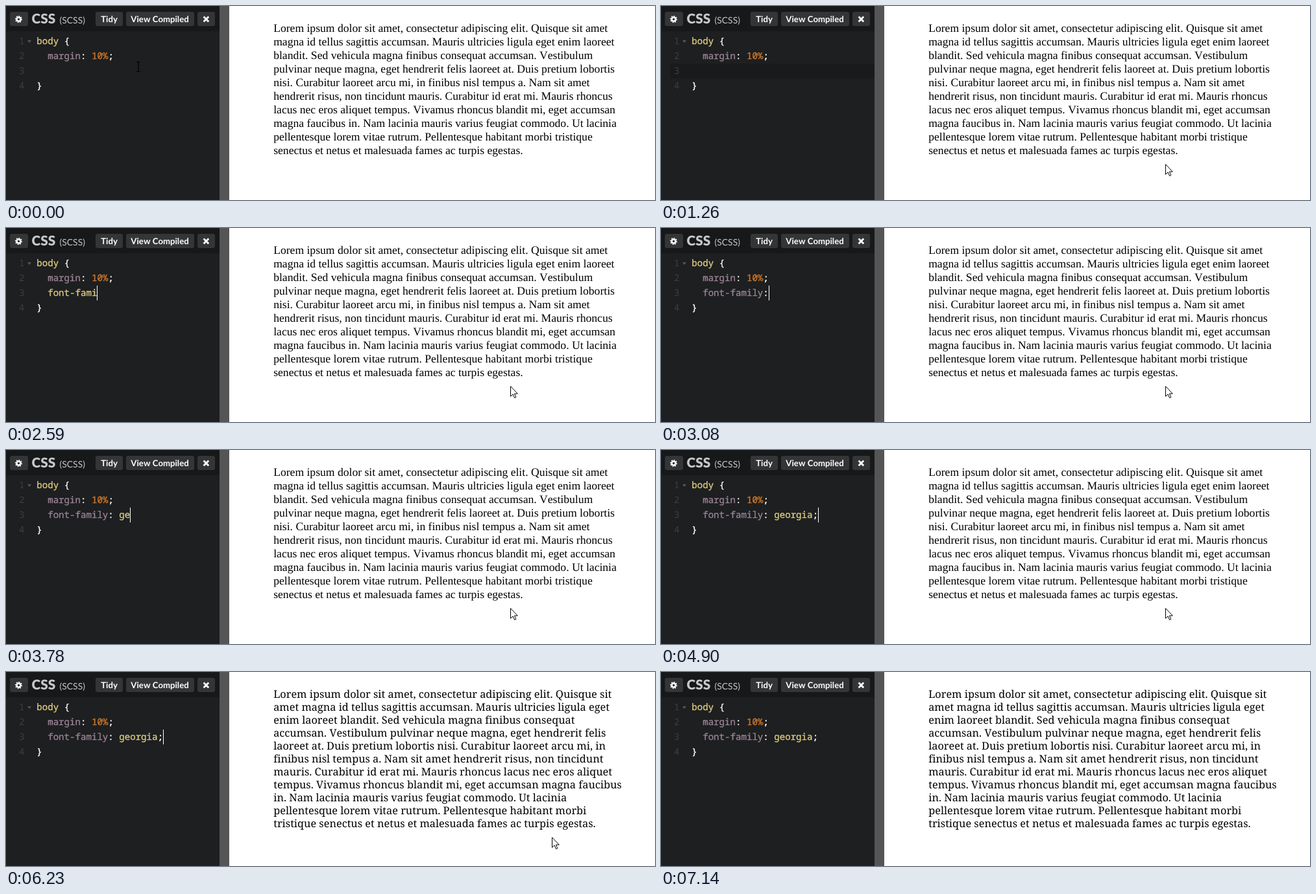
An HTML page for the animation above (7210 ms loop, 1000 px wide and 300 px high).

```html
<!DOCTYPE html>
<html lang="en">
<head>
<meta charset="utf-8">
<title>Typing a font-family rule</title>
<style>
  html, body { margin: 0; width: 100%; height: 100%; overflow: hidden; background: #fff; }
  svg { display: block; width: 1000px; height: 300px; }
  text { white-space: pre; text-rendering: geometricPrecision; font-kerning: none; font-variant-ligatures: none; }
  .code { font: 14.117px "Noto Sans Mono", "DejaVu Sans Mono", monospace; color: #fff; }
  .code text, .code tspan { fill: currentColor; stroke: currentColor; stroke-width: .35px; }
  .sel { color: #ddca7e; }
  .prop { color: #9a8297; }
  .num { color: #d0782a; }
  .code .gutter { color: #3c3f41; stroke: none; }
  .ui { font-family: Lato, "Open Sans", sans-serif; fill: #fff; }
  .label { font-size: 13.2px; font-weight: 700; text-anchor: middle; }
  .btn { fill: #343537; }
  #before { font: 17.6px "Liberation Serif", "Times New Roman", serif; }
  #after { font: 16.3px "Noto Serif", "Liberation Serif", serif; }
</style>
</head>
<body>
<svg viewBox="0 0 1000 300">
  <rect width="1000" height="300" fill="#fff"/>
  <rect width="329" height="300" fill="#1d1f20"/>
  <rect width="329" height="39" fill="#17181a"/>
  <rect x="329" width="15" height="300" fill="#555"/>

  <g class="btn">
    <rect x="6" y="9" width="28" height="22" rx="3"/>
    <rect x="138" y="9" width="42" height="22" rx="3"/>
    <rect x="185" y="9" width="105" height="22" rx="3"/>
    <rect x="295" y="9" width="27" height="22" rx="3"/>
  </g>
  <g fill="none" stroke="#fff">
    <circle cx="19.5" cy="20.5" r="3" stroke-width="2.4"/>
    <circle cx="19.5" cy="20.5" r="4.6" stroke-width="1.9" pathLength="16" stroke-dasharray="1 1"/>
    <path d="M304.6 16.6l7.6 7.6m0-7.6l-7.6 7.6" stroke-width="2.8"/>
  </g>
  <g class="ui">
    <text x="39.6" y="27" font-size="20.8" font-weight="900" fill="#c6c7c8">CSS</text>
    <text x="82.6" y="27" font-size="13.9" fill="#c6c7c8">(SCSS)</text>
    <text class="label" x="159" y="25">Tidy</text>
    <text class="label" x="237" y="25">View Compiled</text>
  </g>

  <rect id="active" x="14" y="89" width="315" height="23" fill="#181a1b"/>
  <path d="M33 53h6l-3 4z" fill="#55585a"/>
  <g class="code">
    <text class="gutter" x="20" y="59">1</text>
    <text class="gutter" x="20" y="82">2</text>
    <text class="gutter" x="20" y="105">3</text>
    <text class="gutter" x="20" y="128">4</text>
    <text x="47.3" y="59"><tspan class="sel">body</tspan> {</text>
    <text x="64.2" y="82"><tspan class="prop">margin</tspan>: <tspan class="num">10%</tspan>;</text>
    <text x="64.2" y="105"><tspan id="name"></tspan><tspan id="colon"></tspan><tspan id="value" class="sel"></tspan><tspan id="semi"></tspan></text>
    <text x="47.3" y="128">}</text>
  </g>
  <rect id="caret" y="89" width="1" height="23" fill="#fff"/>

  <g id="before"></g>
  <g id="after"></g>

  <g id="pointer">
    <path id="beam" d="M-3 -7.5h2.5l.5 .5 .5 -.5h2.5M0 -7v14M-3 7.5h2.5l.5 -.5 .5 .5h2.5" fill="none" stroke="#000" stroke-width="1.2"/>
    <path id="arrow" d="M.5 .8v15.6l3.6 -3.4 2.5 5.7 2.3 -1 -2.5 -5.5h4.9z" fill="#fff" stroke="#000" stroke-width="1"/>
  </g>
</svg>
<script>
const LOOP = 7210, STEP = 70;
const $ = id => document.getElementById(id);
const show = (el, on) => el.setAttribute('visibility', on ? 'inherit' : 'hidden');

const words = `Lorem ipsum dolor sit amet, consectetur adipiscing elit. Quisque sit amet
magna id tellus sagittis accumsan. Mauris ultricies ligula eget enim laoreet
blandit. Sed vehicula magna finibus consequat accumsan. Vestibulum
pulvinar neque magna, eget hendrerit felis laoreet at. Duis pretium lobortis
nisi. Curabitur laoreet arcu mi, in finibus nisl tempus a. Nam sit amet
hendrerit risus, non tincidunt mauris. Curabitur id erat mi. Mauris rhoncus
lacus nec eros aliquet tempus. Vivamus rhoncus blandit mi, eget accumsan
magna faucibus in. Nam lacinia mauris varius feugiat commodo. Ut lacinia
pellentesque lorem vitae rutrum. Pellentesque habitant morbi tristique
senectus et netus et malesuada fames ac turpis egestas.`.split(/\s+/);

// Break the paragraph after the given word counts
function layout(group, counts, pitch) {
  let from = 0;
  counts.forEach((n, i) => {
    const line = document.createElementNS('http://www.w3.org/2000/svg', 'text');
    line.setAttribute('x', 412.2);
    line.setAttribute('y', 40 + i * pitch);
    line.textContent = words.slice(from, from += n).join(' ');
    group.append(line);
  });
}
layout($('before'), [11, 11, 8, 11, 13, 11, 11, 11, 8, 9], 21);
layout($('after'), [10, 10, 8, 8, 11, 11, 11, 9, 9, 7, 10], 20);

const rule = 'font-family: georgia;';
const keys = [1540, 1680, 1820, 1890, 2240, 2310, 2380, 2520, 2590, 2800, 2870,
  3080, 3290, 3570, 3780, 3920, 4060, 4200, 4340, 4410, 4900];
const caretOn = [[70, 560], [1050, 1260], [1470, 5390], [5810, 6300], [6790, 7140]];

// Pointer position and shape; it moves in whole steps
function pointerAt(t) {
  if (t < 1050) return [204, 94, true];
  if (t < 1120) return [312, 118, true];
  if (t < 1190) return [600, 200, true];
  if (t < 1260) return [793, 262, false];
  if (t < 5390) return [777, 244, false];
  if (t < 6090) return [778.5, 245, true];
  if (t >= 6510) return null;
  const k = (Math.floor((t - 6090) / STEP) + 1) / 7;
  return [Math.round(778 + 146 * k), Math.round(245 + 56 * k * k), false];
}

function draw(t) {
  const n = keys.filter(k => k <= t).length;
  const typed = rule.slice(0, n);
  const name = typed.slice(0, 11);
  $('name').textContent = name;
  $('name').setAttribute('class', name === 'font' || name === 'font-family' ? 'prop' : 'sel');
  $('colon').textContent = typed.slice(11, 13);
  $('value').textContent = typed.slice(13, 20);
  $('semi').textContent = typed.slice(20);

  $('caret').setAttribute('x', Math.round(64.2 + 8.47 * n));
  show($('caret'), caretOn.some(([a, b]) => t >= a && t < b));
  show($('active'), t >= 1260 && t < 1470);
  show($('before'), t < 5390);
  show($('after'), t >= 5390);

  const p = pointerAt(t);
  show($('pointer'), p);
  if (p) {
    const [x, y, beam] = p;
    $('pointer').setAttribute('transform', `translate(${x} ${y})`);
    show($('beam'), beam);
    show($('arrow'), !beam);
  }
}

const start = performance.now();
function frame() {
  draw((performance.now() - start) % LOOP);
  requestAnimationFrame(frame);
}
frame();
</script>
</body>
</html>
```
